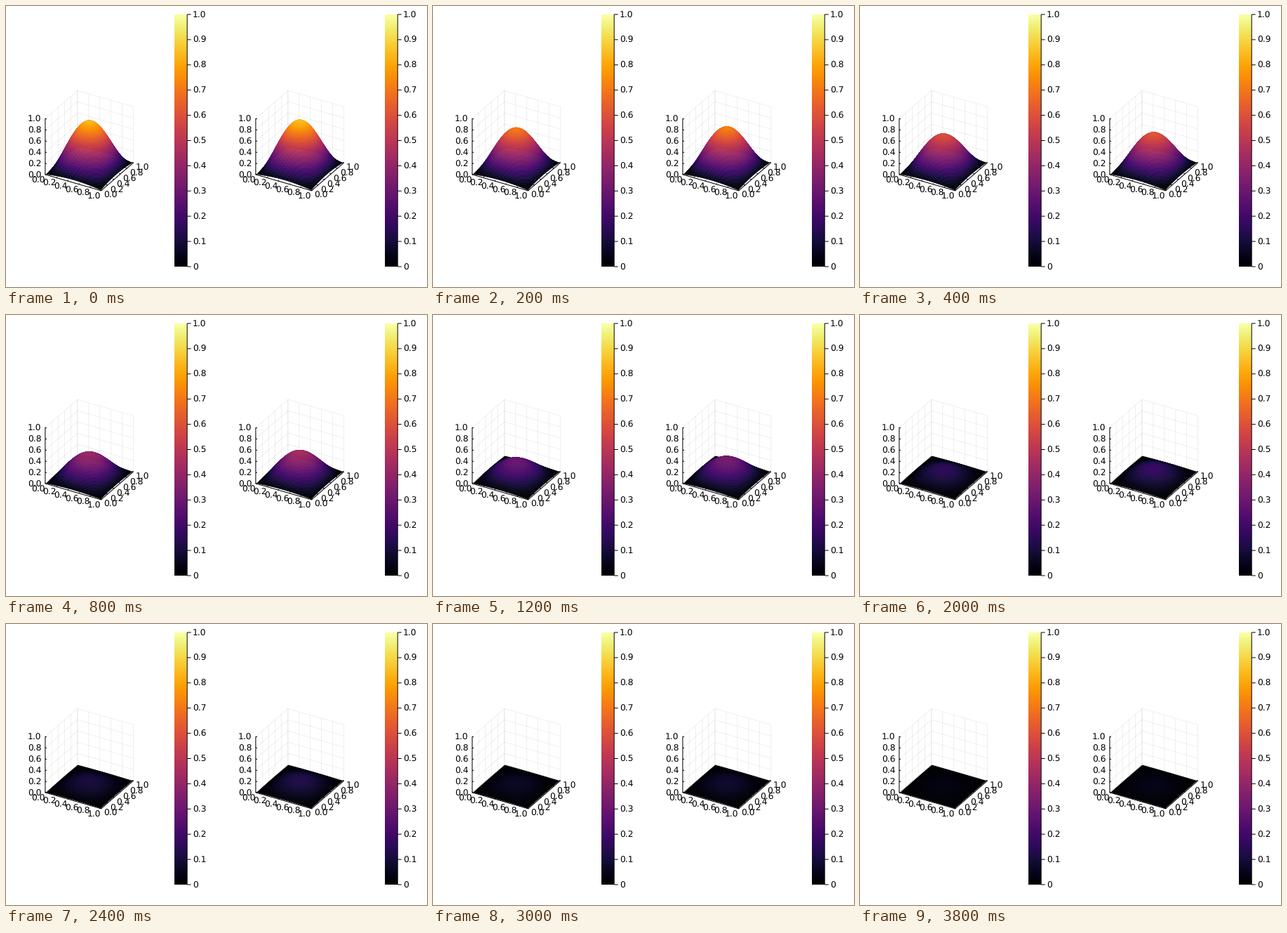
A matplotlib script for the animation above (4 s loop, 600x400 px).

```python
import numpy as np
import matplotlib.pyplot as plt
from matplotlib.animation import FuncAnimation
from matplotlib.collections import LineCollection, PolyCollection

W, H, DPI = 600, 400, 100
PX = 72 / DPI
FRAMES, STEP = 20, 200
RATE = 2 * np.pi**2 * 0.008
DECAY = (1 - RATE, np.exp(-RATE))  # Euler step, exact solution
SCALE, ANGLE = 92, np.pi / 6
TICKS = np.linspace(0, 1, 6)

plt.rcParams["text.hinting"] = "none"
fig = plt.figure(figsize=(W / DPI, H / DPI), dpi=DPI, facecolor="white")
ax = fig.add_axes([0, 0, 1, 1])
ax.set_axis_off()


def project(x, y, z, left):
    """Orthographic view, 30 degrees azimuth and elevation."""
    c, s = np.cos(ANGLE), np.sin(ANGLE)
    u = left + 55.9 + SCALE * (c * x + s * y)
    v = 239.9 + SCALE * (s * s * x - s * c * y - c * z)
    return np.stack(np.broadcast_arrays(u, v), axis=-1)


def strokes(lines, color="black", width=1, z=3):
    ax.add_collection(LineCollection(lines, colors=color, linewidths=width * PX,
                                     snap=False, zorder=z))


def label(x, y, text, ha="left"):
    ax.text(x, y + 4.4, text, ha=ha, va="baseline", fontsize=12.2 * PX,
            family="DejaVu Sans", color="black", zorder=5)


def draw_box(left):
    grid, axes = [], [((0, 0, 0), (1, 0, 0)), ((1, 0, 0), (1, 1, 0)), ((0, 0, 0), (0, 0, 1))]
    for t in TICKS:
        grid += [((0, t, 0), (0, t, 1)), ((t, 1, 0), (t, 1, 1)),
                 ((0, 0, t), (0, 1, t)), ((0, 1, t), (1, 1, t)),
                 ((t, 0, 0), (t, 1, 0)), ((0, t, 0), (1, t, 0))]
        axes += [((t, 0, 0), (t, 0.025, 0)), ((1, t, 0), (0.975, t, 0)),
                 ((0, 0, t), (0.025, 0, t))]
        name = f"{t:.1f}"
        u, v = project(t, 0, 0, left)
        label(u, v + 7.4, name, "right")
        u, v = project(1, t, 0, left)
        label(u + 3.5, v + 6, name)
        u, v = project(0, 0, t, left)
        label(u - 5.6, v + 0.3, name, "right")

    def flat(pairs):
        return [[project(*p, left), project(*q, left)] for p, q in pairs]

    strokes(flat(grid), (0, 0, 0, 0.1), 0.6, 1)
    strokes(flat(axes), z=2)


def draw_colorbar(left):
    ramp = np.linspace(1, 0, 256)[:, None]
    ax.imshow(ramp, cmap="inferno", extent=(left + 240, left + 258, 371, 12),
              aspect="auto", interpolation="nearest")
    x = left + 258.2
    lines = [[(x, 12), (x, 371)]]
    for i in range(11):
        y = 371 - 35.9 * i
        lines.append([(x, y), (x + 5.5, y)])
        label(left + 265.7, y, f"{i / 10:.1f}" if i else "0")
    strokes(lines)


def cells(a):
    """Corner values of every cell, in drawing order."""
    return np.stack([a[:-1, :-1], a[1:, :-1], a[1:, 1:], a[:-1, 1:]], axis=2)


# Rows run from the back (y near 1) to the front, so later cells cover earlier ones.
side = np.arange(1, 65) / 65
X, Y = np.meshgrid(side, side[::-1])
MODE = np.sin(np.pi * X) * np.sin(np.pi * Y)

surfaces = []
for left in (0, 300):
    draw_box(left)
    draw_colorbar(left)
    mesh = PolyCollection([], cmap="inferno", edgecolors="face", linewidths=0.5 * PX,
                          snap=False, zorder=4)
    mesh.set_clim(0, 1)
    ax.add_collection(mesh)
    surfaces.append((mesh, left))

ax.set(xlim=(0, W), ylim=(H, 0))


def update(k):
    for (mesh, left), decay in zip(surfaces, DECAY):
        z = decay ** (k + 1) * MODE
        mesh.set_verts(cells(project(X, Y, z, left)).reshape(-1, 4, 2))
        mesh.set_array(cells(z).mean(axis=2).ravel())
    return [mesh for mesh, _ in surfaces]


anim = FuncAnimation(fig, update, frames=FRAMES, interval=STEP, repeat=True, repeat_delay=0)
plt.show()
```
